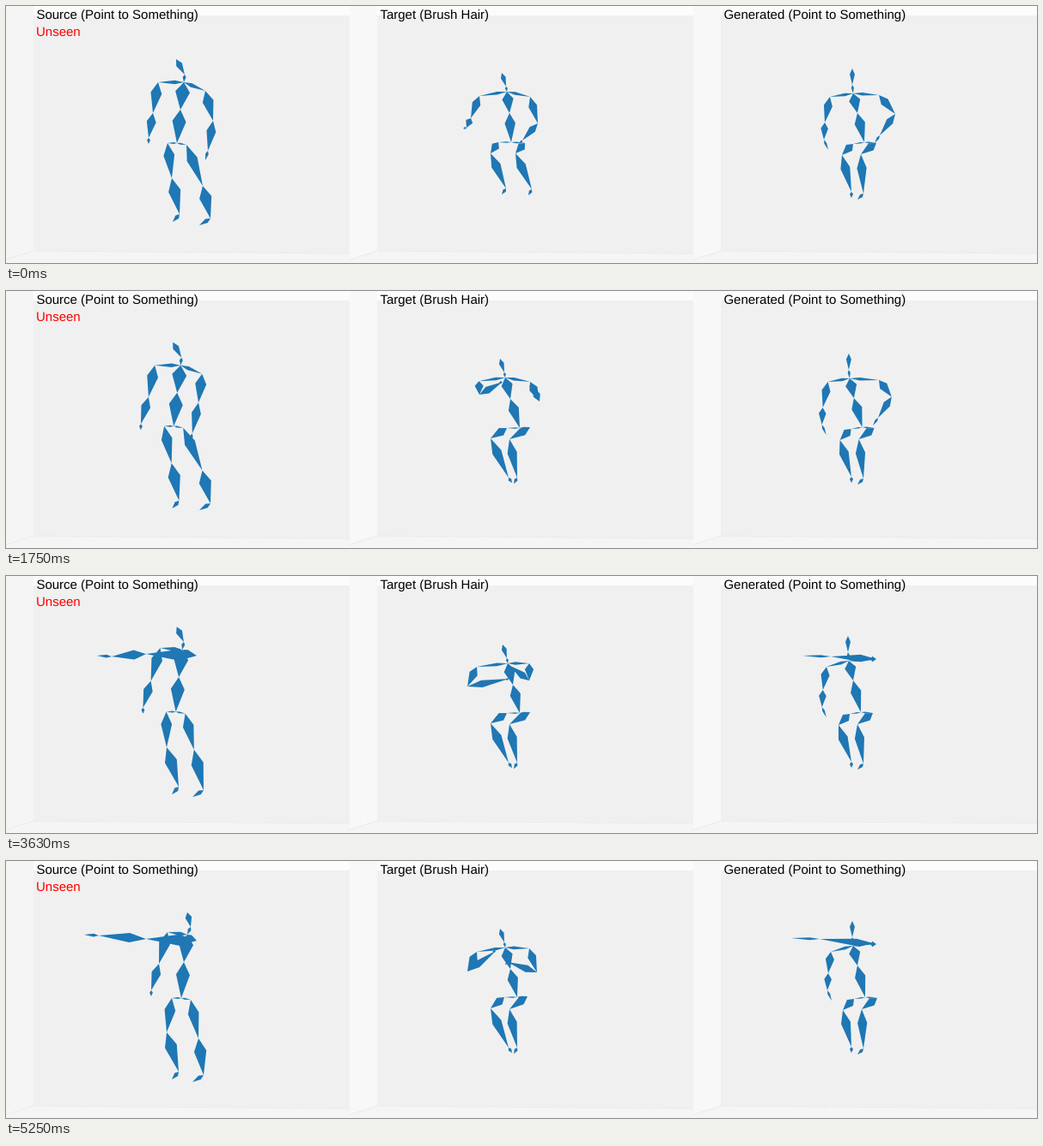
Write an HTML page that moves like this. It is 1200 px wide and 300 px high and loops after 5.31 s.

```html
<!DOCTYPE html>
<html lang="en">
<head>
<meta charset="utf-8">
<title>Skeleton motion</title>
<style>
html, body { margin: 0; width: 100%; height: 100%; overflow: hidden; background: #fcfcfc; }
svg { display: block; width: 1200px; height: 300px; }
text { font: 15px "Liberation Sans", Arial, sans-serif; text-rendering: geometricPrecision; }
</style>
</head>
<body>
<svg id="stage" viewBox="0 0 1200 300"></svg>
<script>
const LOOP = 5310, STEP = 62.5, LAST = 84;
const stage = document.getElementById('stage');

function add(tag, attrs, text) {
  const el = document.createElementNS('http://www.w3.org/2000/svg', tag);
  for (const k in attrs) el.setAttribute(k, attrs[k]);
  if (text) el.textContent = text;
  return stage.appendChild(el);
}

// Room: side wall, back wall, floor
['Source (Point to Something)', 'Target (Brush Hair)', 'Generated (Point to Something)'].forEach((title, i) => {
  const x = i * 400, edge = `M${x} 296L${x + 32} 286L${x + 400} 289`;
  add('rect', { x, y: 0, width: 32, height: 300, fill: i ? '#f8f8f8' : '#f5f5f5' });
  add('path', { d: `M${x + 32} 11H${x + 400}V289L${x + 32} 286Z`, fill: '#f0f0f0' });
  add('path', { d: edge + `V300H${x}Z`, fill: '#f5f5f5' });
  add('path', { d: edge, fill: 'none', stroke: '#ebebeb' });
  add('text', { x: x + 35.4, y: 15 }, title);
});
add('text', { x: 35, y: 35, fill: '#f00' }, 'Unseen');

const BODY = ['head', 'neck', 'chest', 'waist', 'pelvis'];
const ARM = ['shoulder', 'elbow', 'wrist', 'hand'];
const LEG = ['hip', 'knee', 'ankle', 'toe'];
const SIDES = ['L', 'R'];

// Bone half-widths along each chain
const WIDTH = { body: [3.8, 2, 8.5, 8], arm: [2.3, 6.5, 5.5, 1.9], leg: [1, 6.4, 7.2, 2.6] };

function bone([ax, ay], [bx, by], width) {
  const dx = bx - ax, dy = by - ay, len = Math.hypot(dx, dy) || 1;
  const w = Math.min(width, len * 0.45) / len;
  const mx = ax + dx * 0.35, my = ay + dy * 0.35;
  const p = (x, y) => x.toFixed(2) + ' ' + y.toFixed(2);
  return `M${p(ax, ay)}L${p(mx - dy * w, my + dx * w)}L${p(bx, by)}L${p(mx + dy * w, my - dx * w)}Z`;
}

function ease(step, from, to) {
  const u = Math.min(1, Math.max(0, (step - from) / (to - from)));
  return u * u * (3 - 2 * u);
}

// A rest pose plus eased shifts of named joints
class Figure {
  constructor(scale) {
    this.scale = scale;
    this.rest = {};
    this.moves = [];
    this.path = add('path', { fill: '#1f77b4' });
  }
  place(names, side, ...xy) {
    names.forEach((name, i) => { this.rest[name + side] = xy.slice(2 * i, 2 * i + 2); });
    return this;
  }
  move(joints, dx, dy, from, to) {
    this.moves.push({ joints: joints.split(' '), dx, dy, from, to });
    return this;
  }
  draw(step) {
    const at = {};
    for (const name in this.rest) at[name] = [...this.rest[name]];
    for (const m of this.moves) {
      const k = ease(step, m.from, m.to);
      for (const name of m.joints) {
        at[name][0] += m.dx * k;
        at[name][1] += m.dy * k;
      }
    }
    const chain = (names, widths) =>
      widths.map((w, i) => bone(at[names[i]], at[names[i + 1]], w * this.scale)).join('');
    let d = chain(BODY, WIDTH.body);
    for (const s of SIDES) {
      d += chain(['chest', ...ARM.map(n => n + s)], WIDTH.arm);
      d += chain(['pelvis', ...LEG.map(n => n + s)], WIDTH.leg);
    }
    this.path.setAttribute('d', d);
  }
}

const SPINE = 'head neck chest waist';
const HIPS = 'pelvis hipL hipR';
const LEFT_ARM = 'shoulderL elbowL wristL handL';

// Standing, then the right arm swings across to point
const standing = new Figure(1)
  .place(BODY, '', 198, 62, 208, 80, 207, 89, 203, 121, 199, 160)
  .place(ARM, 'L', 177, 89, 171, 125, 166, 154, 166, 161)
  .place(ARM, 'R', 232, 99, 241, 134, 235, 169, 232, 180)
  .place(LEG, 'L', 188, 160, 193, 201, 202, 243, 194, 252)
  .place(LEG, 'R', 210, 162, 229, 210, 238, 248, 225, 256)
  .move(`${SPINE} ${HIPS} ${LEFT_ARM} shoulderR`, -5, -3, 0, 41)
  .move(`${SPINE} ${HIPS} ${LEFT_ARM}`, 9, 0, 41, 84)
  .move(HIPS, 1, 3, 41, 75)
  .move('head', 9, 1, 44, 84)
  .move('neck', 3, 0, 44, 84)
  .move('shoulderL', 7, -3, 41, 70)
  .move('elbowL', -4, 3, 20, 41)
  .move('elbowL', 7, -5, 41, 75)
  .move('wristL handL', -9, 6, 18, 36)
  .move('wristL handL', 8, -6, 41, 73)
  .move('shoulderR', -5, -3, 28, 46)
  .move('elbowR', -18, -4, 16, 30)
  .move('elbowR', -60, -39, 31, 51)
  .move('wristR handR', -19, -3, 14, 30)
  .move('wristR', -106, -78, 32, 50)
  .move('handR', -120, -90, 32, 50)
  .move('wristR handR', 13, 6, 50, 58)
  .move('wristR handR', -18, -7, 58, 71)
  .move('wristR handR', 3, 0, 73, 84)
  .move('kneeL', -6, -1, 26, 41)
  .move('ankleL toeL', -1, 3, 0, 50)
  .move('kneeR', -11, -8, 26, 41)
  .move('kneeR', 6, 5, 50, 84)
  .move('ankleR toeR', -8, 2, 30, 58);

// Sits closer, then both hands work near the head
const brushing = new Figure(0.78)
  .place(BODY, '', 577, 78, 582, 94, 583, 100, 586, 125, 588, 159)
  .place(ARM, 'L', 551, 105, 541, 131, 536, 142, 532, 143)
  .place(ARM, 'R', 610, 106, 619, 137, 601, 157, 598, 160)
  .place(LEG, 'L', 573, 159, 564, 172, 582, 213, 577, 220)
  .place(LEG, 'R', 604, 160, 593, 172, 612, 214, 608, 221)
  .move(SPINE, 4, 1, 0, 18)
  .move('waist', 3, 0, 0, 18)
  .move(SPINE, -6, 0, 18, 28)
  .move(SPINE, 3, 1, 41, 58)
  .move(`${SPINE} ${HIPS}`, -3, -1, 66, 84)
  .move('pelvis hipL', 10, 1, 0, 18)
  .move('hipR', 6, -1, 0, 18)
  .move('shoulderL', -3, 1, 18, 58)
  .move('elbowL', -3, -8, 0, 18)
  .move('elbowL', 13, -2, 18, 28)
  .move('elbowL', -14, 8, 28, 41)
  .move('wristL handL', 40, -37, 0, 18)
  .move('wristL handL', 4, 3, 18, 41)
  .move('wristL handL', 5, 12, 43, 58)
  .move('wristL handL', -15, -15, 58, 73)
  .move('shoulderR', -1, -4, 41, 58)
  .move('elbowR', 2, -8, 0, 18)
  .move('elbowR', -12, -7, 28, 58)
  .move('elbowR', 9, 8, 73, 84)
  .move('wristR handR', 10, -58, 0, 18)
  .move('wristR handR', 1, 10, 18, 28)
  .move('wristR handR', -4, -8, 28, 41)
  .move('wristR handR', -21, 4, 41, 58)
  .move('wristR handR', -3, 13, 73, 84)
  .move('ankleL', 3, 5, 0, 18)
  .move('toeL', 12, 4, 0, 18)
  .move('kneeR', -7, 1, 0, 18)
  .move('ankleR toeR', -17, 4, 0, 18);

// Seated, then the right arm lifts to point
const pointing = new Figure(0.78)
  .place(BODY, '', 985, 73, 985, 92, 986, 102, 991, 125, 999, 159)
  .place(ARM, 'L', 959, 106, 953, 136, 952, 156, 957, 168)
  .place(ARM, 'R', 1016, 104, 1035, 126, 1017, 151, 1011, 160)
  .place(LEG, 'L', 986, 161, 973, 174, 984, 217, 984, 224)
  .place(LEG, 'R', 1013, 160, 995, 173, 998, 219, 991, 226)
  .move(`${SPINE} ${HIPS} ${LEFT_ARM} kneeL kneeR`, -4, 0, 5, 46)
  .move(`${SPINE} ${HIPS} ${LEFT_ARM} kneeL kneeR`, 5, 0, 60, 84)
  .move(SPINE, -2, 0, 5, 35)
  .move(SPINE, 1, -3, 42, 57)
  .move('elbowL wristL handL', 3, -5, 45, 68)
  .move('shoulderR', -10, -7, 30, 58)
  .move('elbowR', -5, -3, 0, 38)
  .move('elbowR', -17, -26, 38, 54)
  .move('wristR handR', -2, -3, 0, 28)
  .move('wristR', -55, -54, 34, 51)
  .move('handR', -82, -64, 34, 51)
  .move('wristR handR', -13, -3, 58, 74);

const figures = [standing, brushing, pointing];
const start = performance.now();
let shown = -1;
function tick() {
  const t = Math.max(0, performance.now() - start) % LOOP;
  const step = Math.min(LAST, Math.floor((t + 4.9) / STEP));
  if (step !== shown) {
    shown = step;
    figures.forEach(f => f.draw(step));
  }
  requestAnimationFrame(tick);
}
tick();
</script>
</body>
</html>
```
